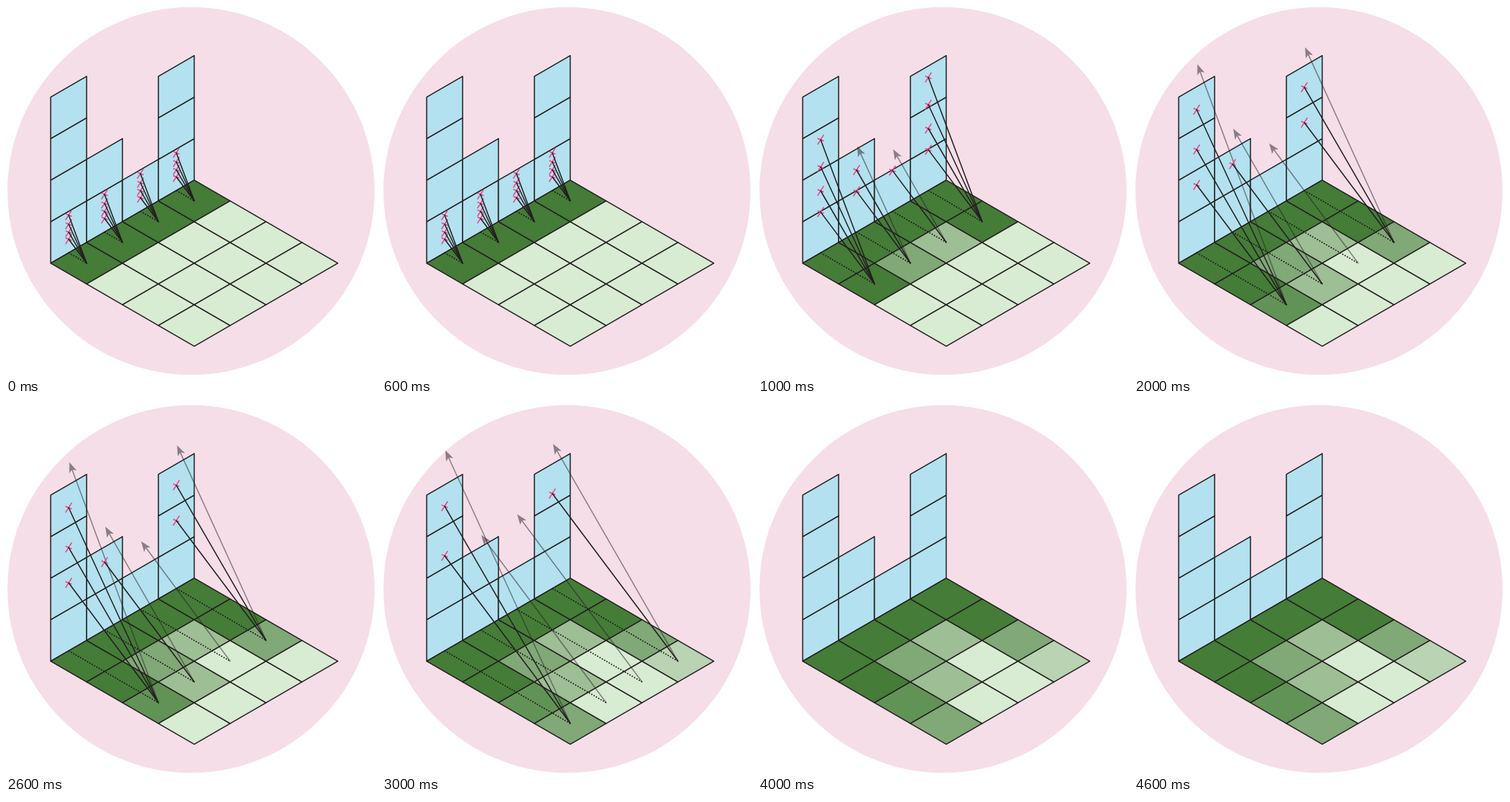
An HTML page for the animation above (5000 ms loop, 500 by 499 pixels).

```html
<!DOCTYPE html>
<html lang="en">
<head>
<meta charset="utf-8">
<title>Sky view rays</title>
<style>
html, body { margin: 0; width: 100%; height: 100%; overflow: hidden; background: #fff; }
svg { display: block; width: 500px; height: 499px; }
.cell { stroke: #231f20; stroke-width: 1.5; stroke-linejoin: round; }
.ray { fill: none; stroke: #231f20; stroke-width: 1.5; stroke-linecap: round; }
.dots { fill: none; stroke: #1a1718; stroke-width: 1.6; stroke-dasharray: 1.7 1.9; }
.hit { fill: none; stroke: #ee3f86; stroke-width: 1.5; }
.miss { opacity: .5; }
.head { fill: #231f20; }
.step { visibility: hidden; animation: show 5s step-end infinite; }
@keyframes show {
  0% { visibility: visible; }
  20%, 100% { visibility: hidden; }
}
</style>
</head>
<body>
<svg id="stage" viewBox="0 0 500 499">
  <circle cx="250" cy="249.5" r="248" fill="#f5dee8"/>
</svg>
<script>
const stage = document.getElementById('stage');
const N = 4, DX = 48.5, DY = 28, H = 56;
const walls = [4, 2, 1, 3];
const slopes = [101.7, 77.2, 55.7, 36.6];   // ray rise per cell of depth
const greens = ['#d8ebd3', '#9ebe95', '#81a877', '#629356', '#457c38'];
const farGreen = '#b9d3b3';

// column, depth and height to the screen
const at = (c, d, h = 0) => [60.4 + DX * (c + d), 346.8 + DY * (d - c) - h];
const path = (pts, close) => 'M' + pts.map(p => p.map(v => v.toFixed(2)).join()).join('L') + (close ? 'Z' : '');

function add(parent, tag, attrs) {
  const el = document.createElementNS('http://www.w3.org/2000/svg', tag);
  for (const k in attrs) el.setAttribute(k, attrs[k]);
  return parent.appendChild(el);
}
const draw = (g, cls, pts) => add(g, 'path', { class: cls, d: path(pts) });
const tile = (g, fill, pts) => add(g, 'path', { class: 'cell', fill, d: path(pts, true) });

const rise = (r, d) => slopes[r] * (d + .5);
const isHit = (c, d, r) => rise(r, d) < walls[c] * H;
const hits = (c, d) => slopes.filter((_, r) => isHit(c, d, r)).length;

function shade(c, d) {
  const n = hits(c, d);
  return n === 1 && d === N - 1 ? farGreen : greens[n];
}

function cross(g, [x, y]) {
  const s = 4.2, tilt = s * DY / DX;
  draw(g, 'hit', [[x - s, y + s + tilt], [x + s, y - s - tilt]]);
  draw(g, 'hit', [[x - s, y - s + tilt], [x + s, y + s - tilt]]);
}

function arrow(g, from, [x, y]) {
  const a = add(g, 'g', { class: 'miss' });
  const len = Math.hypot(x - from[0], y - from[1]);
  const ux = (x - from[0]) / len, uy = (y - from[1]) / len;
  const p = (back, side) => [x - ux * back - uy * side, y - uy * back + ux * side];
  draw(a, 'ray', [from, p(10, 0)]);
  draw(a, 'head', [[x, y], p(14, 5.3), p(10.5, 0), p(14, -5.3)]);
}

function rays(g, c, d) {
  const eye = at(c + .5, d + .5);
  const first = slopes.findIndex((_, r) => isHit(c, d, r));
  const missed = first < 0 ? N - 1 : first - 1;
  if (missed >= 0) {
    const [x, y] = at(c + .5, 0, rise(missed, d));
    arrow(g, eye, [x + 1, y]);
  }
  if (first < 0) return;
  const ends = slopes.slice(first).map((_, i) => at(c + .5, 0, rise(first + i, d)));
  ends.forEach(p => cross(g, p));
  ends.forEach(p => draw(g, 'ray', [eye, p]));
}

walls.forEach((n, c) => {
  for (let h = 0; h < n * H; h += H)
    tile(stage, '#b3e1ef', [at(c, 0, h), at(c + 1, 0, h), at(c + 1, 0, h + H), at(c, 0, h + H)]);
});

for (let s = 0; s <= N; s++) {
  const g = add(stage, 'g', { class: 'step', style: `animation-delay:${s ? s - 5 : 0}s` });
  for (let c = 0; c < N; c++)
    for (let d = 0; d < N; d++)
      tile(g, d <= s ? shade(c, d) : greens[0], [at(c, d), at(c + 1, d), at(c + 1, d + 1), at(c, d + 1)]);
  if (s === N) break;
  for (let c = 0; c < N; c++) draw(g, 'dots', [at(c + .5, 0), at(c + .5, s + .5)]);
  for (let c = 0; c < N; c++) rays(g, c, s);
}
</script>
</body>
</html>
```
